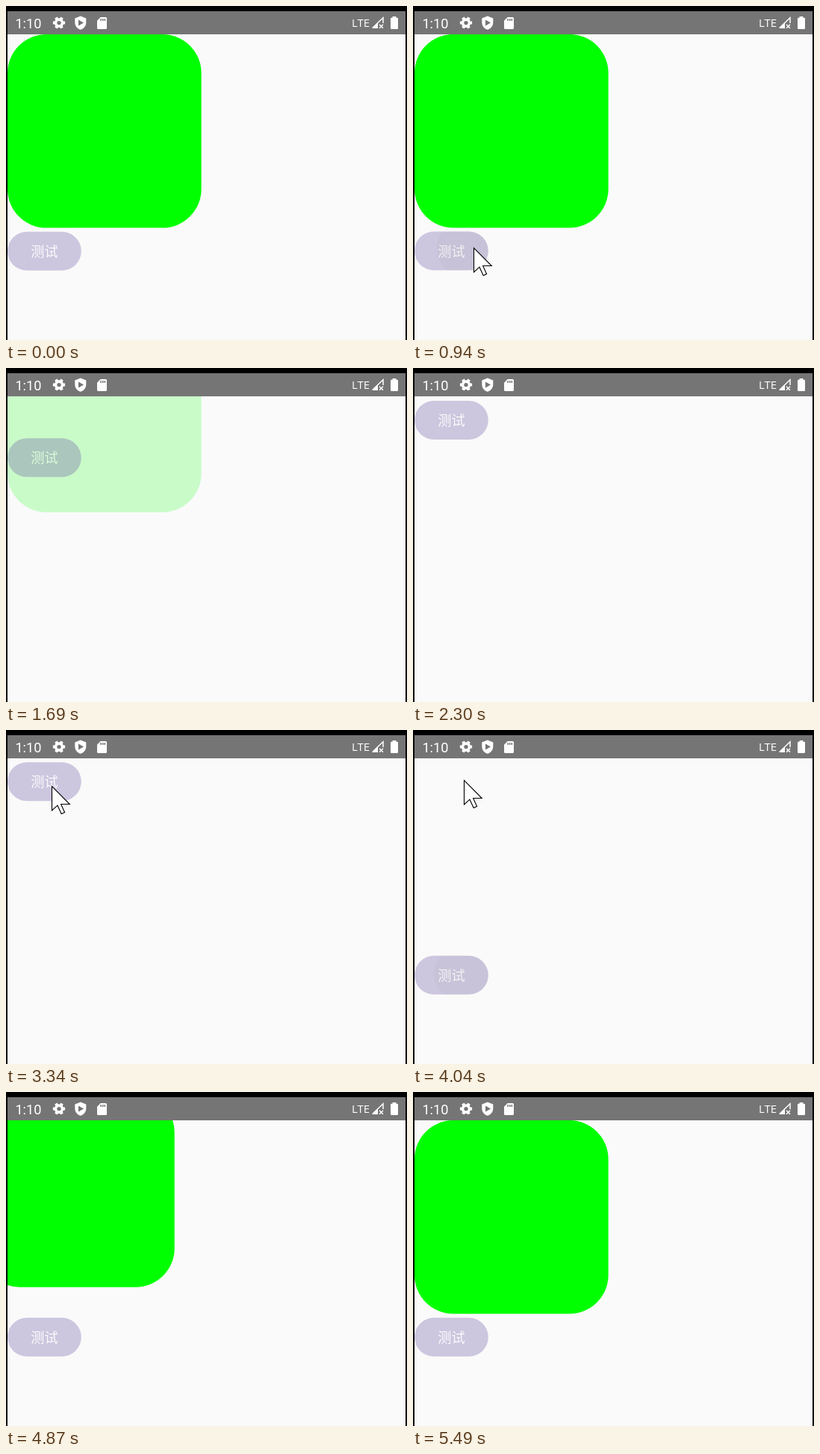
Write an HTML page that moves like this. It is 537 by 448 pixels and loops after 6.15 s.

```html
<!DOCTYPE html>
<html lang="zh">
<head>
<meta charset="utf-8">
<style>
html, body { margin: 0; width: 100%; height: 100%; overflow: hidden; background: #000; }
svg { display: block; width: 537px; height: 448px; }
.ui { font-family: Roboto, "Noto Sans", sans-serif; font-size: 18.2px; }
.net { font-family: "Open Sans", "Noto Sans", sans-serif; font-size: 15px; }
.label { font-family: "Noto Sans CJK SC", "Noto Sans CJK", "Noto Sans CJK JP", sans-serif; font-size: 18.2px; }
</style>
</head>
<body>
<svg viewBox="0 0 537 448" xmlns="http://www.w3.org/2000/svg">
  <defs>
    <clipPath id="page"><rect x="2" y="38" width="533" height="410"/></clipPath>
    <clipPath id="pill"><rect width="98.8" height="52" rx="26"/></clipPath>
  </defs>
  <rect width="537" height="448" fill="#000"/>
  <rect x="2" y="7" width="533" height="441" fill="#fafafa"/>

  <g clip-path="url(#page)">
    <rect id="box" width="259.6" height="259.6" rx="52" fill="#0f0"/>
    <g id="button" opacity=".3">
      <rect width="98.8" height="52" rx="26" fill="#6750a4"/>
      <text class="label" x="31.2" y="33" fill="#fff">测试</text>
      <g clip-path="url(#pill)"><circle id="ripple" fill="#000"/></g>
    </g>
  </g>

  <rect x="2" y="7" width="533" height="31" fill="#757575"/>
  <g fill="#fff">
    <text class="ui" x="12.4" y="29.7">1:10</text>
    <g transform="translate(71 22.6)">
      <circle r="4.5" fill="none" stroke="#fff" stroke-width="3.6"/>
      <g id="teeth" stroke="#fff" stroke-width="4"></g>
    </g>
    <path fill-rule="evenodd" d="M99.8 13.6 L107.3 16.6 V22 C107.3 26.8 104 30.6 99.8 31.8 C95.6 30.6 92.3 26.8 92.3 22 V16.6 Z M97 18.6 V26.6 L104 22.6 Z"/>
    <path fill-rule="evenodd" d="M126.6 15 H133.4 Q135 15 135 16.6 V29.4 Q135 31 133.4 31 H123.6 Q122 31 122 29.4 V19.8 Z M126.4 17 V20 H127.9 V17 Z M129 17 V20 H130.5 V17 Z M131.6 17 V20 H133.1 V17 Z"/>
    <text class="net" x="462.9" y="28">LTE</text>
    <path d="M490 30 L498 22 V30 Z"/>
    <path d="M491 29.3 L505 15.8 V23 M500 24.8 L505 29.8 M505 24.8 L500 29.8" fill="none" stroke="#fff" stroke-width="1.5"/>
    <rect x="515" y="15.7" width="10" height="15.3" rx="1.3"/>
    <rect x="517.6" y="14" width="4.8" height="3"/>
  </g>

  <path id="cursor" d="M.5 .5 V33 L8 26.2 L13.2 37.5 L17.6 35.5 L12.6 24.5 H24.3 Z" fill="#fff" stroke="#000" stroke-width="1.1"/>
</svg>
<script>
const $ = id => document.getElementById(id);
const box = $('box'), button = $('button'), ripple = $('ripple'), cursor = $('cursor');
const LOOP = 6150, STEP = 46.9, PHASE = 940;
const SIZE = 259.6, LEFT = 2, TOP = 38, PAD = 5.2;
const HIDE = 906, SHOW = 4006, SLIDE = 1500;

$('teeth').innerHTML = [0, 60, 120]
  .map(a => `<path d="M-8.1 0H-4M4 0H8.1" transform="rotate(${a})"/>`).join('');

const clamp = x => Math.min(1, Math.max(0, x));
const mix = (a, b, p) => a + (b - a) * p;
const easeIn = x => x * x;
const easeOut = x => 1 - (1 - x) ** 2;

// cubic-bezier(.4, 0, .2, 1)
function ease(x) {
  if (x <= 0) return 0;
  if (x >= 1) return 1;
  let lo = 0, hi = 1, s;
  for (let i = 0; i < 24; i++) {
    s = (lo + hi) / 2;
    if (1.2 * s * (1 - s) ** 2 + .6 * s * s * (1 - s) + s ** 3 < x) lo = s; else hi = s;
  }
  return s * s * (3 - 2 * s);
}

// start, end, from x, y, to x, y, easing
const moves = [
  [330, 705, 119, 432, 81, 324, easeOut],
  [1050, 1205, 81, 324, 121, 462, easeIn],
  [3050, 3330, 160, 260, 61, 75, easeOut],
  [3345, 3665, 61, 75, 69, 68, easeOut],
  [3750, 3800, 69, 68, 68, 67, easeOut],
  [4090, 4390, 68, 67, 264, 470, easeIn]
];

function drawCursor(t, real) {
  const seen = real >= 335 && t < 1205 || real >= 3050 && t < 4390;
  cursor.setAttribute('visibility', seen ? 'visible' : 'hidden');
  const m = moves.filter(m => m[0] <= t).pop() || moves[0];
  const p = m[6](clamp((t - m[0]) / (m[1] - m[0])));
  const x = Math.round(mix(m[2], m[4], p)), y = Math.round(mix(m[3], m[5], p));
  cursor.setAttribute('transform', `translate(${x} ${y})`);
}

function drawRipple(t) {
  const second = t > 3000;
  const age = t - (second ? 3985 : 880);
  const p = ease(age / 225);
  const fade = clamp(age / 75) * (1 - clamp((age - 225) / 150));
  ripple.setAttribute('cx', mix(second ? 66 : 79, 49.4, p));
  ripple.setAttribute('cy', mix(second ? 24 : 21, 26, p));
  ripple.setAttribute('r', mix(30, 69, p));
  ripple.setAttribute('opacity', age > 0 ? .18 * fade : 0);
}

function draw(real) {
  const t = PHASE + STEP * Math.floor((real - PHASE + 12) / STEP);
  let x = 0, y = 0, alpha = 1, space = SIZE;
  if (t < SHOW) {
    const p = ease((t - HIDE) / SLIDE);
    y = -SIZE * p / 2;
    alpha = 1 - p;
    space = SIZE * (1 - p);
  } else {
    x = y = -SIZE * (1 - ease((t - SHOW) / SLIDE));
  }
  box.setAttribute('transform', `translate(${LEFT + x} ${TOP + y})`);
  box.setAttribute('opacity', alpha);
  button.setAttribute('transform', `translate(${LEFT} ${TOP + space + PAD})`);
  drawRipple(t);
  drawCursor(t, real);
}

const start = performance.now();
function tick() {
  draw((performance.now() - start) % LOOP);
  requestAnimationFrame(tick);
}
tick();
</script>
</body>
</html>
```
